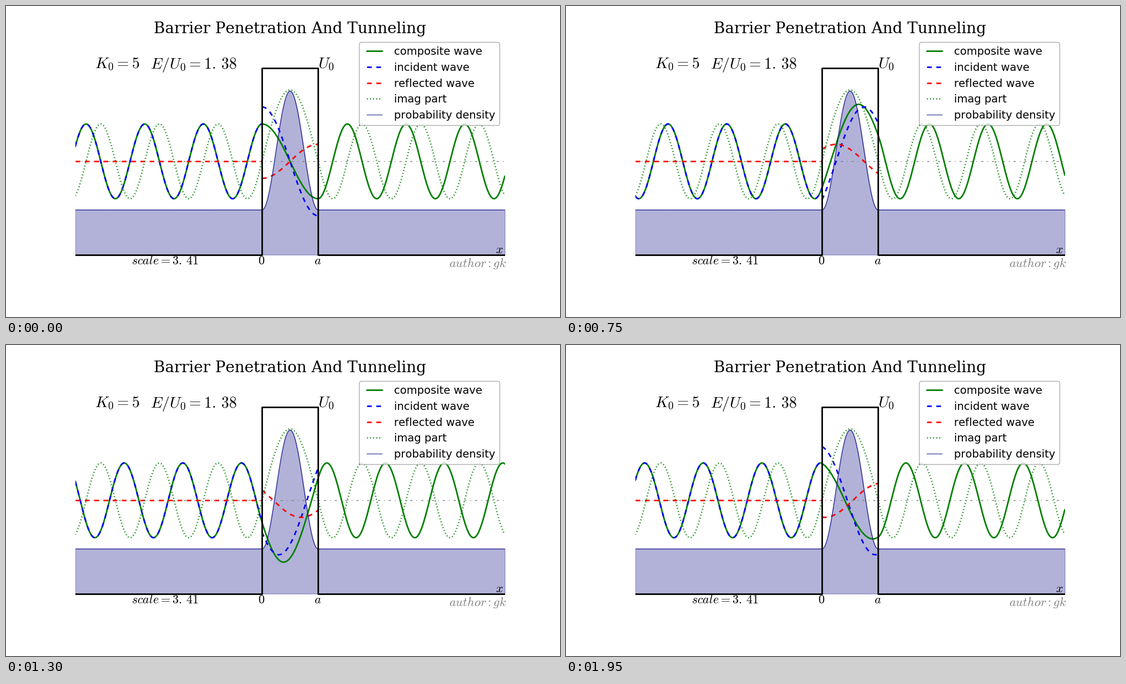
These frames come from a looping animation (998x561 px, 2 s). A matplotlib script:

```python
import numpy as np
import matplotlib.pyplot as plt
from matplotlib.animation import FuncAnimation

W, H, DPI = 998, 561, 100
FRAMES, INTERVAL = 40, 50

plt.rcParams.update({
    "mathtext.fontset": "cm",
    "font.family": "DejaVu Sans",
    "text.kerning_factor": 6,
    "lines.scale_dashes": False,
    "lines.dashed_pattern": [6, 6],
    "lines.dashdot_pattern": [3, 5, 1, 5],
    "lines.dotted_pattern": [1, 3],
})

# Barrier at its first transmission resonance (k1 * a = pi)
K0, RATIO, SPAN = 5, 1.377, 3.41
k = K0 * np.sqrt(RATIO)
k1 = K0 * np.sqrt(RATIO - 1)
a = np.pi / k1
g = k / k1
AMP, FLOOR, TOP = 1.2, -3, 3

left = np.linspace(-SPAN, 0, 500)
mid = np.linspace(0, a, 200)
right = np.linspace(a, a + SPAN, 500)
x = np.concatenate([left, mid, right])

# Complex amplitudes in the three regions
psi = AMP * np.concatenate([
    np.exp(1j * k * left),
    np.cos(k1 * mid) + 1j * g * np.sin(k1 * mid),
    -np.exp(1j * k * (right - a)),
])
inc_out = AMP * np.exp(1j * k * left)
inc_in = AMP * (1 + g) / 2 * np.exp(1j * k1 * mid)
ref_in = AMP * (1 - g) / 2 * np.exp(-1j * k1 * mid)
density = FLOOR + np.abs(psi) ** 2

fig = plt.figure(figsize=(W / DPI, H / DPI), dpi=DPI, facecolor="white")
# Layout of a 16:9 canvas, 998.4 by 561.6, cut to whole pixels
sx, sy = 998.4 / W, 561.6 / H
ax = fig.add_axes([0.125 * sx, 0.1 * sy, 0.775 * sx, 0.8 * sy])
ax.set_xlim(-SPAN, a + SPAN)
ax.set_ylim(-4, 4)
ax.axis("off")
ax.set_title("Barrier Penetration And Tunneling", family="DejaVu Serif",
             size=20, pad=5, y=1.0)

DASH = dict(lw=2, ls="--")
ax.plot([-SPAN, a + SPAN], [0, 0], color="gray", lw=1, ls="-.")
composite, = ax.plot(x, psi.real, "g", lw=2, label="composite wave")
blue_out, = ax.plot(left, inc_out.real, "b", label="incident wave", **DASH)
blue_in, = ax.plot(mid, inc_in.real, "b", **DASH)
ax.plot(left, 0 * left, "r", label="reflected wave", **DASH)
red_in, = ax.plot(mid, ref_in.real, "r", **DASH)
ax.plot(x, psi.imag, "g:", lw=2, label="imag part")
ax.plot(x, density, color="navy", lw=1, alpha=0.7,
        label="probability density")
ax.fill_between(x, FLOOR, density, color="navy", alpha=0.3, lw=1)
ax.plot([-SPAN, 0, 0, a, a, a + SPAN],
        [FLOOR, FLOOR, TOP, TOP, FLOOR, FLOOR], "k", lw=2)
ax.legend(loc="upper right", fontsize=14, numpoints=2, edgecolor="0.6")


def label(px, py, s, size, **kw):
    fig.text(px / W, 1 - py / H, s, size=size, **kw)


label(159.5, 112.5, r"$K_0=5$", 20)
label(259.5, 112.5, r"$E/U_0=1.\hspace{0.2}38$", 20)
label(562.5, 112.5, r"$U_0$", 20)
label(226, 466, r"$scale=3.\hspace{0.2}41$", 16)
label(460.5, 466, r"$0$", 16, ha="center")
label(562, 466, r"$a$", 16, ha="center")
label(882, 446, r"$x$", 16)
label(798, 471, r"$author:gk$", 16, color="gray")


def update(i):
    turn = np.exp(-2j * np.pi * i / FRAMES)
    composite.set_ydata((psi * turn).real)
    blue_out.set_ydata((inc_out * turn).real)
    blue_in.set_ydata((inc_in * turn).real)
    red_in.set_ydata((ref_in * turn).real)
    return composite, blue_out, blue_in, red_in


anim = FuncAnimation(fig, update, frames=FRAMES, interval=INTERVAL,
                     repeat=True, repeat_delay=0)
plt.show()
```
